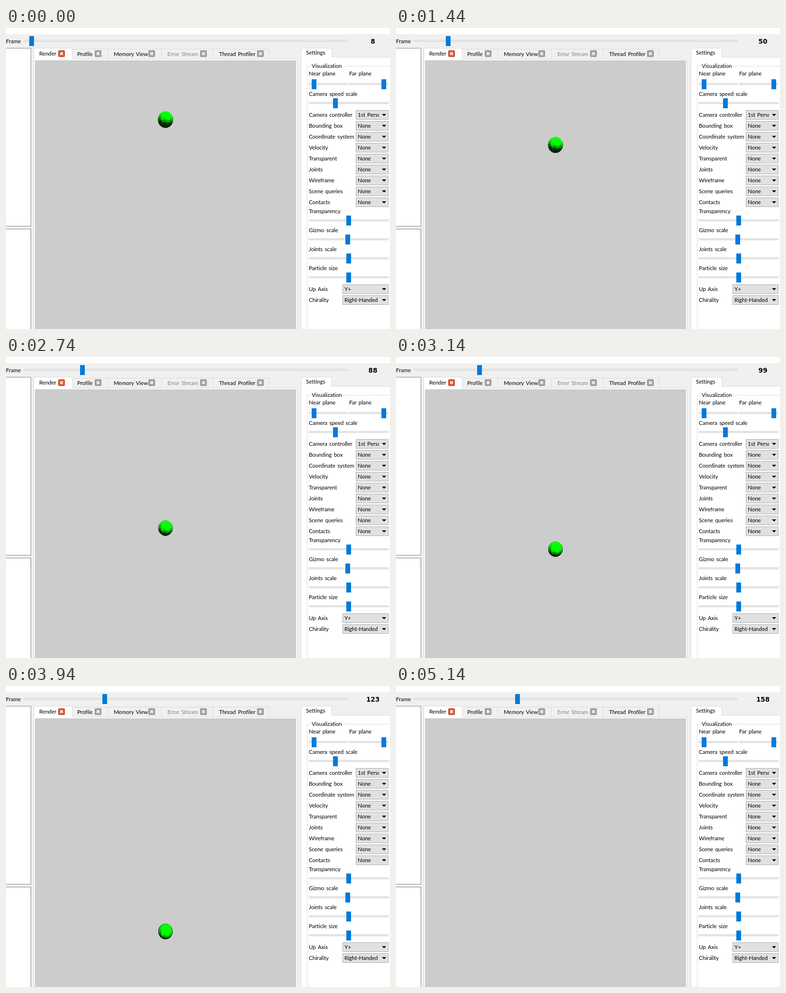
Write an HTML page with a canvas that moves like this. It is 809x634 px and loops after 5240 ms.

```html
<!DOCTYPE html>
<html lang="en">
<head>
<meta charset="utf-8">
<title>Falling sphere</title>
<style>
html, body { margin: 0; width: 100%; height: 100%; overflow: hidden; background: #f0f0f0; }
svg, canvas { position: absolute; left: 0; top: 0; display: block; }
text { font: 11.7px Lato, "Liberation Sans", sans-serif; letter-spacing: -.1px; word-spacing: 1.5px; white-space: pre; }
#count { font: bold 13.5px "DejaVu Sans", sans-serif; letter-spacing: 0; text-anchor: middle; }
</style>
</head>
<body>
<svg id="ui" width="809" height="634" viewBox="0 0 809 634"></svg>
<canvas id="view" width="809" height="634"></canvas>
<script>
const LOOP = 5240;
const rect = (x, y, w, h, fill) =>
  `<rect x="${x}" y="${y}" width="${w}" height="${h}" fill="${fill}"/>`;
const box = (x, y, w, h, fill, line) =>
  `<rect x="${x + .5}" y="${y + .5}" width="${w - 1}" height="${h - 1}" fill="${fill}" stroke="${line}"/>`;
const text = (x, y, s, fill = '#000') => `<text x="${x}" y="${y}" fill="${fill}">${s}</text>`;
const groove = (x, y, w) => box(x, y - 2, w, 4, '#e7eaea', '#d6d6d6');
const handle = (x, y, id = '') =>
  `<rect id="${id}" x="${x}" y="${y - 10}" width="10" height="21" fill="#007ad9"/>`;
const slider = (x, w, y, at) => groove(x, y, w) + handle(at, y);

function closeButton(x, fill, line) {
  return `<rect x="${x + .5}" y="47.5" width="13" height="13" rx="1.5" fill="${fill}" stroke="${line}"/>` +
    `<path d="M${x + 4.2} 51.2l5.6 5.6m0-5.6l-5.6 5.6" stroke="#fff" stroke-width="2"/>`;
}

function tab(x, w, label, tx, cx, color) {
  return box(x, 44, w + 1, 22, '#f0f0f0', '#d9d9d9') + text(tx, 59, label, color) +
    closeButton(cx, '#a3a3a3', '#8c8c8c');
}

function combo(x, cy, value) {
  const w = 806 - x;
  return box(x, cy - 10, w, 20, '#e1e1e1', '#adadad') +
    `<svg x="${x}" y="${cy - 10}" width="${w - 20}" height="20">${text(4, 14, value)}</svg>` +
    `<path d="M792 ${cy - 2}h9l-4.5 4.5z"/>`;
}

const modes = ['Camera controller', 'Bounding box', 'Coordinate system', 'Velocity', 'Transparent',
  'Joints', 'Wireframe', 'Scene queries', 'Contacts'];
const scales = [['Transparency', 717], ['Gizmo scale', 715], ['Joints scale', 717], ['Particle size', 717]];

document.getElementById('ui').innerHTML = [
  rect(0, 0, 809, 634, '#f0f0f0'),
  rect(0, 0, 809, 13, '#fff'),
  text(0, 32, 'Frame'),
  groove(38, 27, 681),
  handle(49, 27, 'seek'),
  '<text id="count" x="773" y="33"></text>',

  box(-2, 42, 55, 376, '#fff', '#828790'),
  box(-2, 423, 55, 220, '#fff', '#828790'),
  rect(51, 424, 1, 23, '#e5e5e5'),

  box(58, 65, 556, 580, '#fff', '#d9d9d9'),
  tab(139, 75, 'Profile', 150, 187),
  tab(214, 113, 'Memory View', 227, 300),
  tab(327, 109, 'Error Stream', 340, 409, '#838383'),
  tab(436, 118, 'Thread Profiler', 449, 529),
  box(58, 42, 82, 26, '#fff', '#d9d9d9'),
  rect(59, 65, 81, 3, '#fff'),
  text(70, 58, 'Render'),
  closeButton(110, '#e4572e', '#b8431f'),
  rect(61, 68, 550, 566, '#ccc'),

  box(621, 61, 200, 600, '#fff', '#d9d9d9'),
  box(621, 42, 66, 21, '#fff', '#d9d9d9'),
  rect(622, 60, 64, 4, '#fff'),
  text(632, 56, 'Settings'),
  '<path d="M642 80.5h-7.5V634M710 80.5h99" fill="none" stroke="#dcdcdc"/>',
  text(644, 84, 'Visualization'),
  text(638, 100, 'Near plane'),
  text(723, 100, 'Far plane'),
  slider(638, 82, 118, 644),
  slider(723, 82, 118, 791),
  text(638, 143, 'Camera speed scale'),
  slider(638, 168, 158, 689),
  ...modes.map((s, i) => text(638, 187 + 23 * i, s) + combo(737, 183 + 23 * i, i ? 'None' : '1st Person')),
  ...scales.map(([s, at], i) => text(638, 390 + 40 * i, s) + slider(638, 168, 405 + 40 * i, at)),
  text(638, 554, 'Up Axis') + combo(709, 550, 'Y+'),
  text(638, 577, 'Chirality') + combo(709, 573, 'Right-Handed')
].join('');

const seek = document.getElementById('seek');
const count = document.getElementById('count');
const ctx = document.getElementById('view').getContext('2d');
const LIGHT = [.18, .6, .78];
const SLICES = 10, STACKS = 10;

function point(i, j) {
  const a = i / SLICES * 2 * Math.PI, b = j / STACKS * Math.PI;
  return [Math.sin(b) * Math.sin(a), Math.cos(b), Math.sin(b) * Math.cos(a)];
}

// Flat-shaded sphere, tilted by the angle it is seen from
function drawBall(cy) {
  const rx = 16.2 - .0026 * (cy - 193);
  const ry = rx * (1 + 2.2e-6 * (cy - 360) ** 2);
  const pitch = Math.atan((cy - 360) / 500);
  const s = Math.sin(pitch), c = Math.cos(pitch);
  ctx.lineWidth = .5;
  ctx.lineJoin = 'round';
  for (let j = 0; j < STACKS; j++) {
    for (let i = 0; i < SLICES; i++) {
      const n = point(i + .5, j + .5);
      if (n[1] * s + n[2] * c < -.1) continue;
      const lit = n.reduce((sum, v, k) => sum + v * LIGHT[k], 0);
      const g = Math.round(255 * Math.min(1, .12 + 1.35 * Math.max(0, lit)));
      ctx.fillStyle = ctx.strokeStyle = `rgb(0,${g},0)`;
      ctx.beginPath();
      for (const [u, v] of [[i, j], [i + 1, j], [i + 1, j + 1], [i, j + 1]]) {
        const [x, y, z] = point(u, v);
        ctx.lineTo(336 + x * rx, cy - (y * c - z * s) * ry);
      }
      ctx.closePath();
      ctx.fill();
      ctx.stroke();
    }
  }
}

// Three simulation ticks per step, with a few timing slips
function ticks(k) {
  if (k < 2) return k;
  const slips = [19, 26, 29, 46].filter(s => k >= s).length;
  return 3 * k - 3 - slips + (k >= 22 ? 1 : 0);
}

let last = -1;
function draw(t) {
  const k = t < 40 ? 0 : 1 + Math.floor((t - 40) / 100);
  if (k === last) return;
  last = k;
  const d = ticks(k), n = d + 8, u = n * n;
  seek.setAttribute('x', Math.floor(49.08 + 1.347 * d));
  count.textContent = n;
  ctx.clearRect(0, 0, 809, 634);
  drawBall(191.6 + .0219 * u - 1.7e-12 * u ** 3);
}

const start = performance.now();
function loop() {
  draw((performance.now() - start) % LOOP);
  requestAnimationFrame(loop);
}
loop();
</script>
</body>
</html>
```
